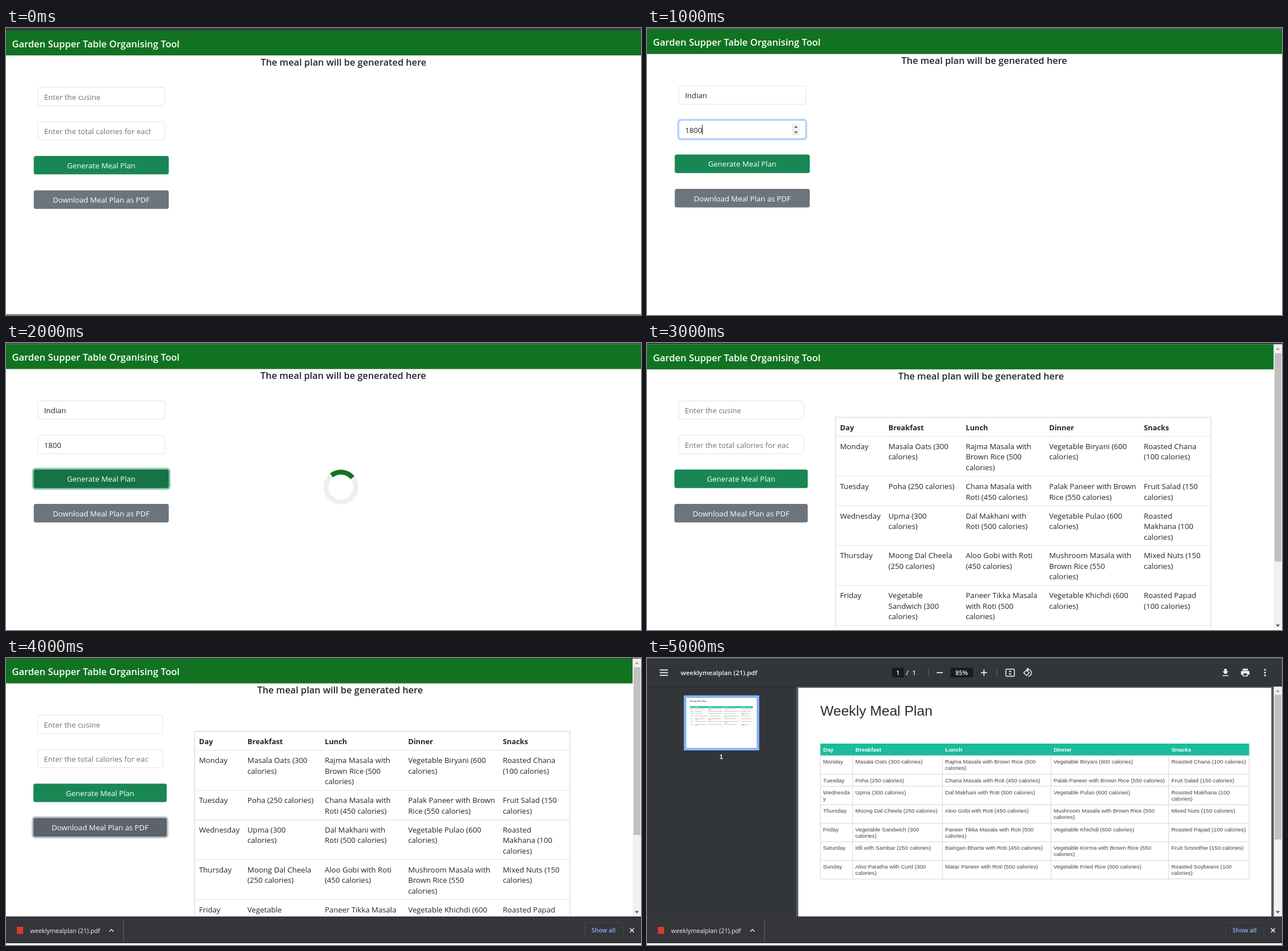
An HTML page for the animation above (6000 ms loop, 1112x503 px).

```html
<!DOCTYPE html>
<html lang="en">
<head>
<meta charset="utf-8">
<title>Meal planner demo</title>
<style>
  html, body { margin: 0; width: 100%; height: 100%; overflow: hidden; background: #fff; }
  svg { display: block; width: 1112px; height: 503px; font-family: "Open Sans", "Noto Sans", sans-serif; }
  .pdf { font-family: "Liberation Sans", Arial, sans-serif; }
</style>
</head>
<body>
<svg id="stage" viewBox="0 0 1112 503" xmlns="http://www.w3.org/2000/svg"></svg>
<script>
const LOOP = 6000, STEP = 1000;
const GREEN = '#117321', INK = '#212529', BAR = '#35363a', LINE = '#dee2e6';
const FILE = 'weeklymealplan (21).pdf';

const HEADS = ['Day', 'Breakfast', 'Lunch', 'Dinner', 'Snacks'];
// Line breaks: | on the web page, ^ in the document, * in both, ~ splits a word in the document
const MEALS = [
  ['Monday', 'Masala Oats (300|calories)', 'Rajma Masala with|Brown Rice (500*calories)', 'Vegetable Biryani (600|calories)', 'Roasted Chana|(100 calories)'],
  ['Tuesday', 'Poha (250 calories)', 'Chana Masala with|Roti (450 calories)', 'Palak Paneer with Brown|Rice (550 calories)', 'Fruit Salad (150|calories)'],
  ['Wednesda~y', 'Upma (300|calories)', 'Dal Makhani with|Roti (500 calories)', 'Vegetable Pulao (600|calories)', 'Roasted|Makhana (100*calories)'],
  ['Thursday', 'Moong Dal Cheela|(250 calories)', 'Aloo Gobi with Roti|(450 calories)', 'Mushroom Masala with|Brown Rice (550*calories)', 'Mixed Nuts (150|calories)'],
  ['Friday', 'Vegetable|Sandwich (300*calories)', 'Paneer Tikka Masala|with Roti (500*calories)', 'Vegetable Khichdi (600|calories)', 'Roasted Papad|(100 calories)'],
  ['Saturday', 'Idli with Sambar (250 calories)', 'Baingan Bharta with Roti (450 calories)', 'Vegetable Korma with Brown Rice (550^calories)', 'Fruit Smoothie (150 calories)'],
  ['Sunday', 'Aloo Paratha with Curd (300^calories)', 'Matar Paneer with Roti (500 calories)', 'Vegetable Fried Rice (600 calories)', 'Roasted Soybeans (100^calories)']
];
const webLines = s => s.replace('~', '').replace('^', ' ').split(/[|*]/);
const pdfLines = s => s.replace('|', ' ').split(/[~^*]/);

const rect = (x, y, w, h, fill, extra = '') =>
  `<rect x="${x}" y="${y}" width="${w}" height="${h}" fill="${fill}" ${extra}/>`;
const text = (x, y, s, size, fill, extra = '') =>
  `<text x="${x}" y="${y}" font-size="${size}" fill="${fill}" ${extra}>${s}</text>`;
const path = (d, stroke, width = 1, extra = '') =>
  `<path d="${d}" fill="none" stroke="${stroke}" stroke-width="${width}" ${extra}/>`;
const solid = (d, fill, extra = '') => `<path d="${d}" fill="${fill}" ${extra}/>`;
const group = (s, extra) => `<g ${extra}>${s}</g>`;
const shift = (s, dy) => group(s, `transform="translate(0 ${dy})"`);
const MID = 'text-anchor="middle"', SEMI = 'font-weight="600"', BOLD = 'font-weight="700"';

function header(top, bottom, width, mid) {
  return rect(0, 0, 1112, top, '#3a3942') +
    rect(0, top, width, bottom - top, GREEN) +
    text(10.5, bottom - 14.4, 'Garden Supper Table Organising Tool', 16.5, '#fff', SEMI) +
    text(mid, bottom + 17.5, 'The meal plan will be generated here', 16.3, INK, MID + ' ' + SEMI);
}

function field(x, y, w, value, typed, focus) {
  const ring = focus ? rect(x - 2.8, y - 2.8, w + 5.6, 37.8, '#c2dbfe', 'rx="6"') : '';
  const label = text(x + 11, y + 21.8, value, 13.1, typed ? INK : '#6c757d');
  return ring + rect(x, y, w, 32.2, '#fff', `rx="4" stroke="${focus ? '#86b7fe' : LINE}"`) +
    group(label, typed ? '' : `clip-path="url(#${w > 221 ? 'wide' : 'slim'})"`);
}

function button(x, y, w, label, fill, ring) {
  return (ring ? rect(x - 3, y - 3, w + 6, 38.4, ring, 'rx="6"') : '') +
    rect(x, y, w, 32.4, fill, 'rx="3.5"') +
    text(x + w / 2, y + 21.6, label, 13.1, '#fff', MID);
}

function form({ slim, cuisine, calories, focus, press }) {
  const x = slim ? 55.2 : 55.7, w = slim ? 219.2 : 222.2;
  const bx = slim ? 48 : 48.6, bw = slim ? 233.5 : 236.4;
  return field(x, 104, w, cuisine || 'Enter the cusine', cuisine) +
    field(x, 164.2, w, calories || 'Enter the total calories for each', calories, focus) +
    button(bx, 224.2, bw, 'Generate Meal Plan', press === 1 ? '#157347' : '#198754', press === 1 && '#94c8b0') +
    button(bx, 284.5, bw, 'Download Meal Plan as PDF', press === 2 ? '#5c636a' : '#6c757d', press === 2 && '#c0c3c7');
}

function scrollbar(top, bottom, from, to) {
  const x = 1104.7;
  return rect(1097.5, top, 14.5, bottom - top, '#f1f1f1') +
    rect(1099, from, 12, to - from, '#c1c1c1') +
    solid(`M${x - 3.5} ${top + 9.5}h7l-3.5 -4z`, '#a3a3a3') +
    solid(`M${x - 3.5} ${bottom - 9.5}h7l-3.5 4z`, '#505050');
}

function webTable() {
  const cols = [338, 422.8, 558.2, 704.2, 870];
  const lines = [163.5, 233.7, 285.2, 354.9, 424.9, 495];
  let s = HEADS.map((h, i) => text(cols[i], 152.8, h, 12.8, INK, BOLD)).join('');
  MEALS.slice(0, 5).forEach((row, r) => row.forEach((cell, c) =>
    webLines(cell).forEach((t, n) => { s += text(cols[c], lines[r] + 22.4 + n * 18.5, t, 13.15, INK); })));
  s += lines.map(y => path(`M331 ${y}H987`, LINE)).join('');
  return s + path('M330.3 510V130.2H987.5V510', '#e3e6e9', 2);
}

function downloads() {
  return rect(0, 453, 1112, 47, BAR) + rect(0, 500, 1112, 3, '#fff') +
    rect(19, 471, 11, 12.5, '#d93a2b') +
    text(42.3, 482, FILE, 10.8, '#f1f3f4') +
    path('M181 479.5l3.7-3.7 3.7 3.7', '#e8eaed', 1.5) +
    path('M205.7 458V497', '#696b70') +
    rect(1013.5, 463.5, 67, 26.5, 'none', 'rx="3" stroke="#44474c"') +
    text(1046.5, 481, 'Show all', 10.5, '#8ab4f8', MID + ' ' + SEMI) +
    path('M1092.7 473.7l7 7m0-7l-7 7', '#f1f3f4', 1.6);
}

function loader() {
  const r = 26.2, at = deg => {
    const a = deg * Math.PI / 180;
    return `${586.5 + r * Math.cos(a)} ${252.5 + r * Math.sin(a)}`;
  };
  return `<circle cx="586.5" cy="252.5" r="${r}" fill="none" stroke="#ebf2ec" stroke-width="8.6"/>` +
    path(`M${at(231)}A${r} ${r} 0 0 1 ${at(321)}`, GREEN, 8.6);
}

function toolbar() {
  const c = '#f1f1f1', num = (x, s) => text(x, 29.6, s, 11, c, MID + ' ' + SEMI);
  return rect(0, 0, 1112, 50, '#323639') + rect(0, 0, 1112, 1, '#5b5c60') +
    path('M22.3 20.8h14.4m-14.4 4.8h14.4m-14.4 4.8h14.4', c, 1.8) +
    text(59, 29.6, FILE, 11.4, c, SEMI) +
    rect(429, 17, 21, 17, '#191b1c') + rect(531.5, 17, 39.5, 17, '#191b1c') +
    num(439.4, '1') + num(455.6, '/') + num(467.6, '1') + num(551, '85%') +
    path('M492.7 19v13M612.7 19v13', '#6d7073') +
    path('M507.3 25.6h10.6M584.7 25.6h10.8m-5.4-5.4v10.8', c, 1.7) +
    rect(628.4, 19.4, 15, 12.6, 'none', `rx="1.5" stroke="${c}" stroke-width="1.5"`) +
    solid('M633.3 24.4h5.2l-2.6-3zM633.3 27h5.2l-2.6 3z', c) +
    path('M664.5 21.3l4.7 4.7-4.7 4.7-4.7-4.7zM667 19.7a6.2 6.2 0 1 1 0 12.4', c, 1.5) +
    solid('M667.8 16.6v6.2l-3.4-3.1z', c) +
    solid('M19 9h-4V3H9v6H5l7 7 7-7zM5 18v2h14v-2z', c, 'transform="translate(1004 16.8) scale(.75)"') +
    solid('M19 8H5q-3 0-3 3v6h4v4h12v-4h4v-6q0-3-3-3zM16 19H8v-5h8zM18 3H6v4h12z', c,
      'fill-rule="evenodd" transform="translate(1038.6 16.6) scale(.75)"') +
    [20.6, 25.6, 30.6].map(y => `<circle cx="1082.3" cy="${y}" r="1.6" fill="${c}"/>`).join('');
}

function sheet() {
  const xs = [303.5, 360, 517.3, 707.2, 913.4, 1054.5];
  const ys = [171, 203.6, 224.6, 257.2, 289.8, 322, 354.7, 387.3];
  let s = text(303.5, 101, 'Weekly Meal Plan', 24.6, '#2b2b2b') +
    rect(303.5, 150, 751, 21, '#1abc9c') +
    HEADS.map((h, i) => text(xs[i] + 5, 163.6, h, 9.9, '#fff', BOLD)).join('');
  MEALS.forEach((row, r) => row.forEach((cell, c) =>
    pdfLines(cell).forEach((t, n) => { s += text(xs[c] + 4.8, ys[r] + 14 + n * 11.2, t, 9.86, '#444'); })));
  return s + path(ys.map(y => `M303.5 ${y}H1054.5`).join('') + xs.map(x => `M${x} 171V387.3`).join(''), '#d6d6cf');
}

function thumbnail() {
  const mini = group(sheet(), 'transform="translate(30.5 62.5) scale(.147)"');
  return rect(64.5, 65.5, 132, 96.5, '#8ab4f8') + rect(69, 70, 123, 87.5, '#fff') + mini +
    text(130, 176.7, '1', 11, '#f1f1f1', MID + ' ' + SEMI);
}

function viewer() {
  return rect(0, 50, 1112, 403, '#323639') +
    rect(261, 50, 836.5, 403, '#525659') +
    rect(0, 50, 261, 1.5, '#2a2d30') +
    rect(264.8, 52.3, 828.5, 401, '#fff') +
    group(sheet() + thumbnail(), 'class="pdf"') +
    scrollbar(50, 453, 64.5, 318) + toolbar() + downloads();
}

const stepper = rect(254, 170.4, 13.3, 20, '#f0efee') +
  solid('M257.7 177.2h6l-3-3.4zM257.7 183.8h6l-3 3.4z', '#4b4b4b');
const caret = path('M97 172.2V189.2', '#111', 1.1);

const planned = press => form({ slim: true, press });
const scenes = [
  header(4, 48, 1112, 591) + form({}) + rect(0, 502, 1112, 1, '#2d2c36'),

  header(1.6, 45.6, 1112, 590.7) +
    shift(form({ cuisine: 'Indian', calories: '1800', focus: true }) + stepper + caret, -2.4),

  header(1.6, 45.6, 1112, 590.7) +
    shift(form({ cuisine: 'Indian', calories: '1800', press: 1 }), -2.4) + loader(),

  header(2.4, 46.2, 1097.5, 585) + shift(planned(), -2.4) + webTable() +
    scrollbar(2.4, 503, 18, 383) + rect(0, 499, 1112, 4, '#fff'),

  header(1, 44.5, 1097.5, 585) + shift(planned(2), -4) + shift(webTable(), -1.7) +
    scrollbar(1, 453, 16, 310) + downloads(),

  viewer()
];

const stage = document.getElementById('stage');
stage.innerHTML =
  '<defs><clipPath id="wide"><path d="M60 90H254.3V210H60z"/></clipPath>' +
  '<clipPath id="slim"><path d="M60 90H250V210H60z"/></clipPath></defs>' +
  scenes.map(s => group(rect(0, 0, 1112, 503, '#fff') + s, 'class="scene" display="none"')).join('');
const layers = [...stage.querySelectorAll('.scene')];

function draw(ms) {
  const now = Math.floor((ms % LOOP) / STEP);
  layers.forEach((g, i) => g.setAttribute('display', i === now ? 'inline' : 'none'));
}

const start = performance.now();
function tick() {
  draw(performance.now() - start);
  requestAnimationFrame(tick);
}
tick();
</script>
</body>
</html>
```
